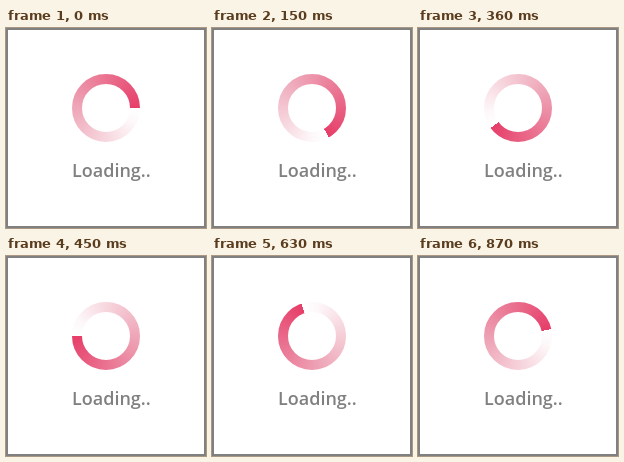
These frames come from a looping animation (200x200 px, 900 ms). An HTML page with a canvas:

```html
<!DOCTYPE html>
<html lang="en">
<head>
<meta charset="utf-8">
<title>Loading</title>
<style>
  html, body { margin: 0; width: 100%; height: 100%; overflow: hidden; background: #fff; }
  canvas { display: block; width: 200px; height: 200px; }
</style>
</head>
<body>
<canvas id="stage" width="200" height="200"></canvas>
<script>
const ctx = document.getElementById('stage').getContext('2d');
const LOOP = 900, STEP = 30, TURN = Math.PI * 2;
const CX = 100, CY = 80, OUTER = 34, INNER = 24;

function drawFrame() {
  ctx.fillStyle = '#fff';
  ctx.fillRect(0, 0, 200, 200);
  ctx.strokeStyle = '#808080';
  ctx.lineWidth = 2;
  ctx.strokeRect(1, 1, 198, 198);
}

function drawRing(angle) {
  const fade = ctx.createConicGradient(angle, CX, CY);
  fade.addColorStop(0, '#fff');
  fade.addColorStop(0.08, '#fdf8f9');
  fade.addColorStop(0.5, '#eea6b8');
  fade.addColorStop(1, '#e63e69');
  ctx.strokeStyle = fade;
  ctx.lineWidth = OUTER - INNER;
  ctx.beginPath();
  ctx.arc(CX, CY, (OUTER + INNER) / 2, 0, TURN);
  ctx.stroke();
}

function drawLabel() {
  ctx.fillStyle = '#808080';
  ctx.font = '600 18px "Open Sans", "Noto Sans", sans-serif';
  ctx.fillText('Loading..', 66, 149);
}

function render(now) {
  const step = Math.floor((now % LOOP) / STEP);
  drawFrame();
  drawRing(step * STEP / LOOP * TURN);
  drawLabel();
  requestAnimationFrame(render);
}

render(performance.now());
</script>
</body>
</html>
```
